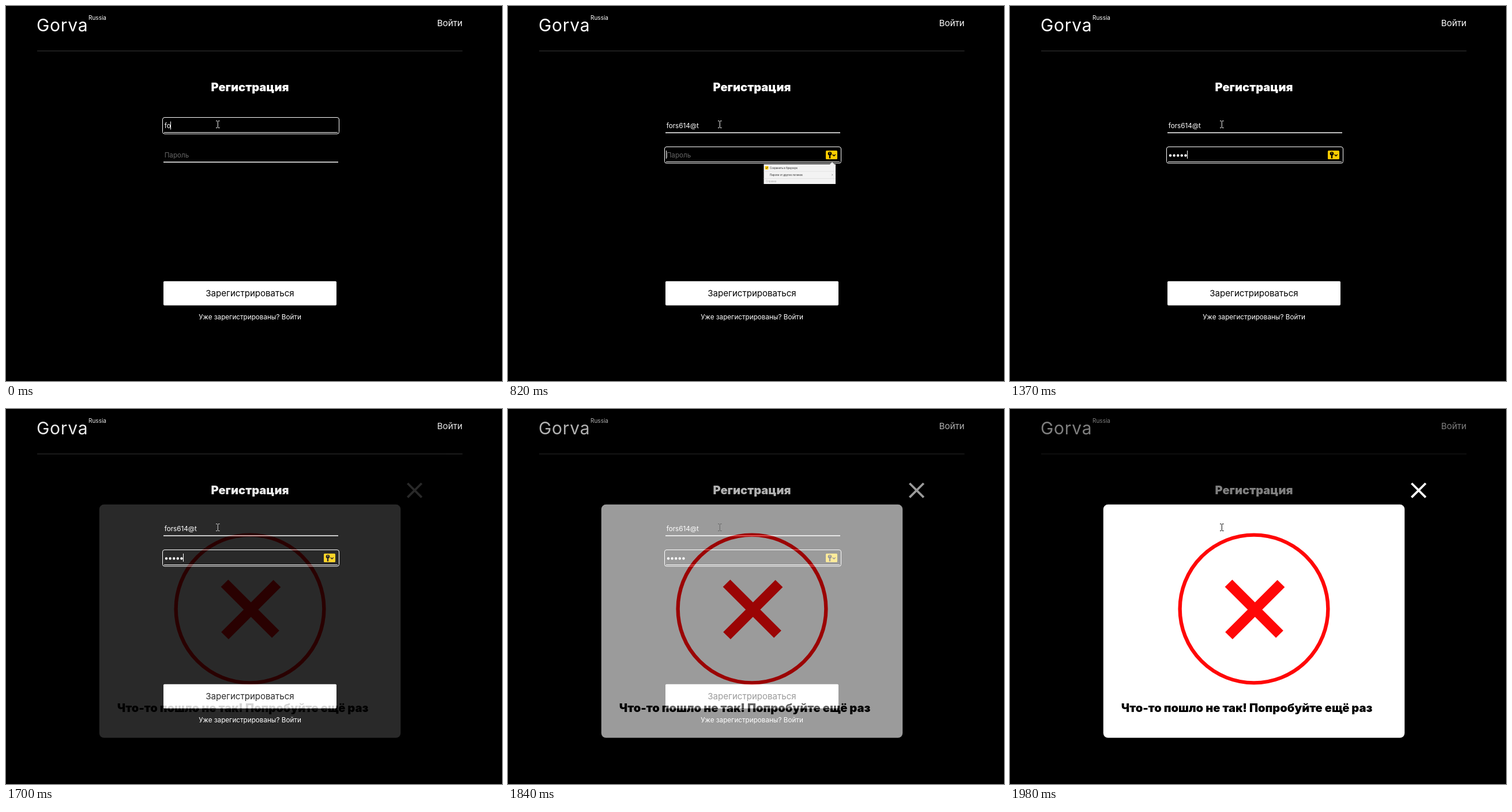
Write an HTML page that moves like this. It is 860 by 651 pixels and loops after 2.66 s.

```html
<!DOCTYPE html>
<html lang="ru">
<head>
<meta charset="utf-8">
<title>Регистрация</title>
<style>
  html, body { margin: 0; width: 100%; height: 100%; overflow: hidden; background: #000; }
  svg { display: block; width: 860px; height: 651px; isolation: isolate; }
  text { font-family: Inter, "Open Sans", sans-serif; font-optical-sizing: none; fill: #fff; white-space: pre; }
  .small { font-size: 11.7px; }
  .mid { font-size: 15.08px; }
  .title { font-size: 20.1px; font-weight: 900; }
  .tiny { font-size: 4.4px; fill: #222; }
  .line { fill: none; stroke: #fff; }
  .cursor { mix-blend-mode: difference; }
</style>
</head>
<body>
<svg viewBox="0 0 860 651">
  <rect width="860" height="651"/>

  <!-- header -->
  <text x="53" y="43.5" font-size="30" letter-spacing=".7">Gorva</text>
  <text x="143" y="23.5" font-size="10">Russia</text>
  <text class="mid" x="791.5" y="35" text-anchor="end">Войти</text>
  <rect x="54" y="77.5" width="737.5" height="1" fill="#3b3b3b"/>

  <!-- form -->
  <text class="title" x="423" y="148.3" text-anchor="middle">Регистрация</text>

  <g id="mailRing" class="line">
    <rect x="271.5" y="193.5" width="306" height="28.5" rx="3.5"/>
    <path d="M274 219.5H575" stroke-width="1"/>
  </g>
  <path id="mailLine" class="line" d="M273 220H576" stroke-width="1.7"/>
  <text id="mail" class="small" x="274.7" y="212"></text>

  <g id="passRing" class="line">
    <rect x="271.5" y="244.5" width="306" height="28.5" rx="3.5"/>
    <path d="M274 270.5H575" stroke-width="1"/>
  </g>
  <path id="passLine" class="line" d="M273 271H576" stroke-width="1.7"/>
  <text id="hint" class="small" x="274.7" y="263" style="fill:#666">Пароль</text>
  <g id="dots" fill="#fff"></g>
  <rect id="caret" width="1" height="14" fill="#fff"/>

  <g id="key">
    <rect x="551" y="251" width="20" height="15" rx="1.5" fill="#fc0"/>
    <circle cx="558" cy="256.3" r="3.3"/>
    <path d="M558 257V264.5" stroke="#000" stroke-width="2.4"/>
    <circle cx="558" cy="255.2" r=".9" fill="#fc0"/>
    <path d="M562.7 257.7L565.2 260.2L567.7 257.7" fill="none" stroke="#000" stroke-width="1.4"/>
  </g>

  <g id="menu">
    <path d="M557.5 275.5L562 271L566.5 275.5Z" fill="#f3f3f3"/>
    <rect x="443.5" y="274.7" width="124.5" height="34.3" fill="#f3f3f3"/>
    <path d="M443.5 287H568M443.5 299.5H568" stroke="#ddd" stroke-width=".8"/>
    <rect x="445.7" y="278" width="5.8" height="5.8" rx="1" fill="#fc0"/>
    <path d="M447 280.8L448.4 282.2L450.4 279.4" fill="none" stroke="#222" stroke-width=".8"/>
    <text class="tiny" x="454" y="282.7">Сохранить в браузере</text>
    <text class="tiny" x="454" y="294.8">Пароли от других логинов</text>
    <path d="M561.5 291.8L562.8 293.1L561.5 294.4" fill="none" stroke="#555" stroke-width=".7"/>
    <text class="tiny" x="447" y="305.5" style="fill:#aaa">Справка</text>
  </g>

  <rect x="273" y="477.8" width="300" height="42" rx="1.7" fill="#fff"/>
  <text class="mid" x="423" y="503.7" text-anchor="middle" style="fill:#000">Зарегистрироваться</text>
  <text class="small" x="423" y="544" text-anchor="middle">Уже зарегистрированы? Войти</text>

  <!-- error dialog -->
  <g id="dialog">
    <rect width="860" height="651" fill-opacity=".5"/>
    <rect x="161.8" y="165.8" width="522.4" height="405" rx="8" fill="#fff"/>
    <path class="line" d="M696.3 129L720.7 153.4M720.7 129L696.3 153.4" stroke-width="3.8"/>
    <g fill="none" stroke="#ff0707">
      <circle cx="423" cy="347" r="128.4" stroke-width="6.4"/>
      <path d="M379 302.5L467.5 391M470 303L379.5 393.5" stroke-width="18"/>
    </g>
    <text class="title" x="192.7" y="525.7" style="fill:#000">Что-то пошло не так! Попробуйте ещё раз</text>
  </g>

  <path class="cursor line" stroke="#eee" d="M364 199.5H366.5M368 199.5H370.5M367.3 200V211M364 211.5H366.5M368 211.5H370.5"/>
</svg>
<script>
  const LOOP = 2660;
  const MAIL = 'fors614@t';
  const mailTimes = [0, 0, 70, 150, 230, 320, 400, 480, 610];
  const dotTimes = [890, 960, 1030, 1370, 1370];
  const fadeTimes = [1700, 1770, 1840, 1910, 1980];
  const fadeLevels = [0, 0.16, 0.39, 0.608, 0.83, 1];
  const FOCUS = 820;

  const el = id => document.getElementById(id);
  const [mail, mailRing, mailLine, passRing, passLine, hint, dots, caret, key, menu, dialog] =
    ['mail', 'mailRing', 'mailLine', 'passRing', 'passLine', 'hint', 'dots', 'caret', 'key', 'menu', 'dialog'].map(el);

  const passed = (times, t) => times.filter(at => at <= t).length;
  const show = (node, on) => node.setAttribute('visibility', on ? 'visible' : 'hidden');

  dotTimes.forEach((_, i) => {
    const dot = document.createElementNS('http://www.w3.org/2000/svg', 'circle');
    dot.setAttribute('cx', 278 + 6.6 * i);
    dot.setAttribute('cy', 259.5);
    dot.setAttribute('r', 2.2);
    dots.append(dot);
  });

  function draw(t) {
    const onPass = t >= FOCUS;
    const typed = MAIL.slice(0, passed(mailTimes, t));
    if (mail.textContent !== typed) mail.textContent = typed;

    show(mailRing, !onPass);
    show(mailLine, onPass);
    show(passRing, onPass);
    show(passLine, !onPass);
    show(key, onPass);
    show(menu, t >= FOCUS && t < 1100);

    const count = passed(dotTimes, t);
    show(hint, count === 0);
    [...dots.children].forEach((dot, i) => show(dot, i < count));

    const caretX = onPass ? 274.7 + 6.6 * count : 274.7 + mail.getComputedTextLength();
    caret.setAttribute('x', Math.floor(caretX));
    caret.setAttribute('y', onPass ? 251 : 200.5);
    show(caret, t < 680 || (onPass && t < 1840));

    dialog.setAttribute('opacity', fadeLevels[passed(fadeTimes, t)]);
  }

  const start = performance.now();
  function tick() {
    draw((performance.now() - start) % LOOP);
    requestAnimationFrame(tick);
  }
  tick();
</script>
</body>
</html>
```
